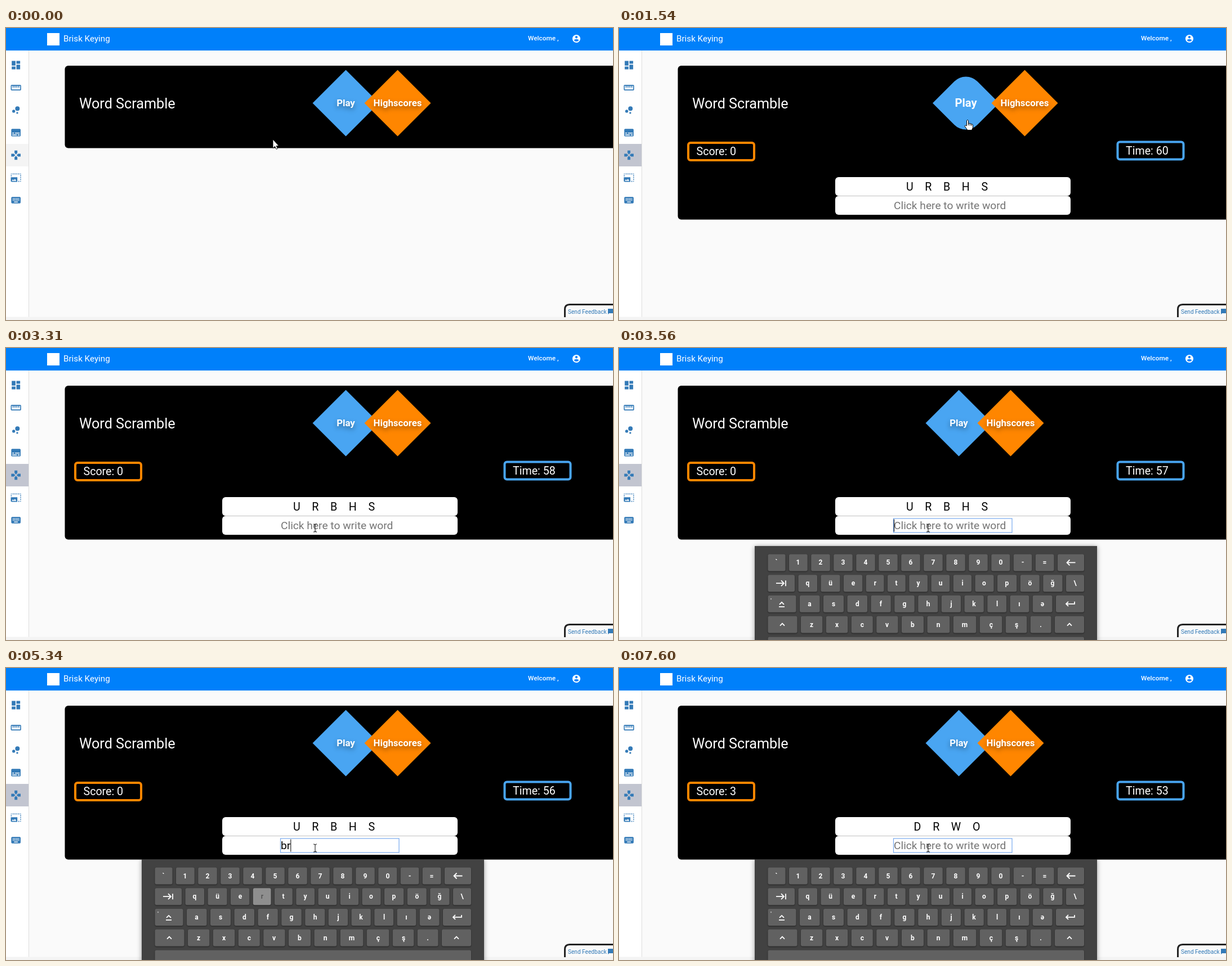
Write an HTML page that moves like this. It is 1078 by 519 pixels and loops after 8000 ms.

```html
<!DOCTYPE html>
<html lang="en">
<head>
<meta charset="utf-8">
<title>Word Scramble</title>
<style>
  html, body { margin: 0; width: 100%; height: 100%; overflow: hidden; background: #fafafa; }
  svg { display: block; font-family: Roboto, sans-serif; }
  .shade { filter: drop-shadow(0 4px 4px rgba(0,0,0,.4)); }
  .big { font-size: 19.6px; fill: #fff; }
  .button { font-weight: 700; font-size: 16.8px; fill: #fff; text-anchor: middle; }
  #keyboard { filter: drop-shadow(0 1px 4px rgba(0,0,0,.4)); }
  #keys { filter: drop-shadow(0 1px 1px rgba(0,0,0,.45)); font-weight: 700; font-size: 12px; text-anchor: middle; }
  #keys path { fill: none; stroke: #fff; stroke-width: 1.8; }
</style>
</head>
<body>
<svg width="1078" height="519" viewBox="0 0 1078 519">
  <rect width="1078" height="519" fill="#fafafa"/>
  <rect y="40" width="40" height="474" fill="#fff"/>
  <rect x="40" y="40" width="1" height="474" fill="#dedede"/>
  <rect y="513.5" width="1078" height="6" fill="#f4f4f4"/>
  <rect id="active" y="206" width="40" height="40"/>
  <g id="menu" fill="#337ab7"></g>

  <rect width="1078" height="40" fill="#0080fa"/>
  <rect x="73" y="9" width="22" height="22" fill="#fff"/>
  <text x="102" y="23.5" font-size="15.2" fill="#fff">Brisk Keying</text>
  <text x="927" y="22" font-size="11.8" font-weight="500" fill="#fff">Welcome ,</text>
  <path transform="translate(1004.6 10.6) scale(.7)" fill="#fff" d="M12 2C6.48 2 2 6.48 2 12s4.48 10 10 10 10-4.48 10-10S17.52 2 12 2zm0 3c1.66 0 3 1.34 3 3s-1.34 3-3 3-3-1.34-3-3 1.34-3 3-3zm0 14.2c-2.5 0-4.71-1.28-6-3.22.03-1.99 4-3.08 6-3.08 1.99 0 5.97 1.09 6 3.08-1.29 1.94-3.5 3.22-6 3.22z"/>

  <rect id="panel" x="104.5" y="67" width="1000" rx="6"/>
  <text x="130" y="142.5" font-size="25.2" fill="#fff">Word Scramble</text>
  <g id="play">
    <path id="playShape" fill="#49a5f2"/>
    <text id="playText" class="button">Play</text>
  </g>
  <g id="high">
    <path fill="#ff8600" d="M-59 0 0-59 59 0 0 59z"/>
    <text class="button shade" y="5.5">Highscores</text>
  </g>

  <g id="game">
    <rect x="123" y="204" width="117" height="31" rx="4" fill="none" stroke="#ff8600" stroke-width="4"/>
    <text id="score" class="big" x="137.5" y="226"></text>
    <rect x="885.5" y="202.5" width="117" height="31" rx="4" fill="none" stroke="#49a5f2" stroke-width="4"/>
    <text id="time" class="big" x="900" y="224.5"></text>
    <rect x="384" y="265" width="418" height="33.5" rx="6" fill="#fff"/>
    <rect x="384" y="298.5" width="418" height="33.5" rx="6" fill="#fff"/>
    <text id="letters" x="582.5" y="289" font-size="19.6" text-anchor="middle" word-spacing="15.8"></text>
    <rect id="focus" x="487.5" y="303" width="210.5" height="25" fill="none" stroke="#77a9ee" stroke-width="1.2"/>
    <text id="entry" x="488" y="322" font-size="19.2"></text>
    <rect id="caret" y="304.5" width="1" height="22"/>
  </g>

  <path d="M992.5 514V500q0-8.500 8.500-8.500H1080V514" fill="#fafafa" stroke="#222" stroke-width="3"/>
  <rect x="994" y="513.5" width="84" height="6" fill="#f4f4f4"/>
  <text x="998" y="507.500" font-size="10.100" fill="#337ab7">Send Feedback</text>
  <path d="M1069 499h10v8h-8l-2 2z" fill="#337ab7"/>

  <g id="keyboard">
    <rect x="241" y="340" width="608" height="206" fill="#424242"/>
    <g id="keys"></g>
    <circle cx="270" cy="434" r="1.200" fill="#aaa"/>
  </g>

  <g id="cursor" stroke-linejoin="round">
    <path id="arrow" d="M0 0V15.500L3.500 12.300 6 17.500 8.400 16.400 6 11.500H10.500z" fill="#fff" stroke="#000" stroke-width=".8"/>
    <path id="hand" d="M-1.500 9.500V1.500Q0-1 1.500 1.500V7Q3 5.800 4.200 7.200 6 6.300 7 8q2-.5 2.500 1.500V14L7.500 18.500H0L-5 11.500Q-4.500 8.800-1.500 11zM1.500 7V10M4.200 7.500V10.500M7 8.200V11" fill="#fff" stroke="#000" stroke-width="1"/>
    <path id="beam" d="M-3-7Q0-7 0-5 0-7 3-7M0-5.500V5.500M-3 7Q0 7 0 5 0 7 3 7" fill="none" stroke="#222" stroke-width="1.100"/>
  </g>
</svg>
<script>
const $ = id => document.getElementById(id);
const clamp = v => Math.max(0, Math.min(1, v));
const ramp = (t, a, b) => clamp((t - a) / (b - a));
const show = (id, on) => $(id).style.display = on ? '' : 'none';
const move = (id, x, y) => $(id).setAttribute('transform', `translate(${x} ${y})`);

// Side menu, drawn on a 24-unit grid
const menuIcons = [
  'M3 13h8V3H3zM3 21h8v-6H3zM13 21h8V11h-8zM13 3v6h8V3z',
  'M21 6H3c-1.1 0-2 .9-2 2v8c0 1.1.9 2 2 2h18c1.1 0 2-.9 2-2V8c0-1.100-.9-2-2-2zm0 10H3V8h2v4h2V8h2v4h2V8h2v4h2V8h2v4h2V8h2z',
  'M4 14.400a3.200 3.200 0 1 0 6.400 0 3.200 3.200 0 1 0-6.400 0M12.800 18a2 2 0 1 0 4 0 2 2 0 1 0-4 0M10.400 8.800a4.800 4.800 0 1 0 9.600 0 4.800 4.800 0 1 0-9.600 0',
  'M20 4H4c-1.100 0-2 .9-2 2v12c0 1.100.9 2 2 2h16c1.100 0 2-.9 2-2V6c0-1.100-.9-2-2-2zM4 12h4v2H4zm10 6H4v-2h10zm6 0h-4v-2h4zm0-4H10v-2h10z',
  'M15 7.500V2H9v5.500l3 3zM7.500 9H2v6h5.500l3-3zM9 16.500V22h6v-5.500l-3-3zM16.500 9l-3 3 3 3H22V9z',
  'M21 15h2v2h-2zm0-4h2v2h-2zm2 8h-2v2c1 0 2-1 2-2zM13 3h2v2h-2zm8 4h2v2h-2zm0-4v2h2c0-1-1-2-2-2zM1 7h2v2H1zm16-4h2v2h-2zm0 16h2v2h-2zM3 3C2 3 1 4 1 5h2zm6 0h2v2H9zM5 3h2v2H5zm-4 8v8c0 1.100.9 2 2 2h12V11zm2 8l2.500-3.200 1.800 2.100 2.500-3.200L13 19z',
  'M4 5Q2 5 2 7V17q0 2 2 2H20q2 0 2-2V7q0-2-2-2z' +
    [5, 8, 11, 14, 17].map(x => `M${x} 8v2h2v-2zM${x} 11v2h2v-2z`).join('') + 'M8 15v2h8v-2z'
];
$('menu').innerHTML = menuIcons.map((d, i) =>
  `<path transform="translate(7.700 ${56 + 40 * i}) scale(.83)" fill-rule="evenodd" d="${d}"/>`).join('');

// Keyboard rows: first width, last width, labels, label centres
const keyIcons = {
  '←': 'M8 0H-7m5-5-5 5 5 5', '⇥': 'M-9 0H5m-5-5 5 5-5 5M8-5V5', '⇪': 'M-4 1 0-3 4 1M-5 5H5',
  '↵': 'M8-4V0H-7m4-4-4 4 4 4', '^': 'M-4 2 0-2 4 2'
};
const rows = [
  [31, 47, '`1234567890-=←', [279.5, 318, 358, 398, 438, 478, 518, 558, 598, 638, 678, 717, 756, 802.5]],
  [47.5, 32, '⇥qüertyuiopöğ\\', [288, 335, 375.5, 416, 455, 492.5, 531.5, 571, 610, 648.5, 689, 730, 770, 810]],
  [50, 50, '⇪asdfghjklıə↵', [289, 338.5, 381, 423.5, 465, 507, 549, 590, 630.5, 671.5, 711, 752, 801]],
  [52, 52, '^zxcvbnmçş.^', [290, 342, 387, 432, 476, 521.5, 567, 614, 661, 706, 749, 800]]
];
const LEFT = 264.5, RIGHT = 826, GAP = 6.5;
const keyBox = (x, y, w) => `<rect x="${x}" y="${y}" width="${w}" height="30" rx="3" fill="#616161"/>`;
let keyMarkup = keyBox(LEFT, 501.5, RIGHT - LEFT);
rows.forEach(([first, last, labels, mid], r) => {
  const y = 354.5 + 36.7 * r, end = mid.length - 1;
  // centre of the gap that follows key i
  const seam = i => i < 0 ? LEFT - GAP / 2 : i === end ? RIGHT + GAP / 2 :
    i === 0 ? LEFT + first + GAP / 2 : i === end - 1 ? RIGHT - last - GAP / 2 : (mid[i] + mid[i + 1]) / 2;
  mid.forEach((x, i) => {
    const c = labels[i], a = seam(i - 1) + GAP / 2;
    keyMarkup += `<g id="key-${r}-${c}">` + keyBox(a, y, seam(i) - GAP / 2 - a) + (keyIcons[c]
      ? `<path transform="translate(${x} ${y + 15})" d="${keyIcons[c]}"/>`
      : `<text x="${x}" y="${y + 19}" fill="#fff">${c}</text>`) + '</g>';
  });
});
$('keys').innerHTML = keyMarkup;

const START = 1540, FOCUS = 3480, SOLVED = 7050;
const ticks = [1620, 2460, 3480, 4490, 5500, 6500, 7515];
const strokes = [[4810, 'b', 3], [5340, 'r', 1], [5680, 'u', 1], [6500, 's', 2], [6970, 'h', 2]];
const path = [[383, 474, 198], [850, 619, 163], [2003, 619, 163], [2380, 572, 276],
  [2540, 556, 313], [2780, 556, 313], [3020, 551, 319], [3160, 547, 319], [3310, 549, 320]];

function pointer(t) {
  const i = path.findIndex(p => p[0] > t);
  if (i === 0) return path[0].slice(1);
  if (i < 0) return path[path.length - 1].slice(1);
  const [t0, x0, y0] = path[i - 1], [t1, x1, y1] = path[i], k = (t - t0) / (t1 - t0);
  return [x0 + (x1 - x0) * k, y0 + (y1 - y0) * k];
}

function draw(t) {
  const s = Math.floor((t + 10) / 77) * 77;

  const [x, y] = pointer(s), hand = t >= 690 && t < 2150, beam = t >= 2300;
  move('cursor', x, y);
  show('arrow', !hand && !beam);
  show('hand', hand);
  show('beam', beam);

  const hover = ramp(s, 650, 800) - ramp(s, 2060, 2230);
  const press = ramp(s, 1340, 1460) - ramp(s, 1545, 1690);
  const r = 29 * press, k = r / Math.SQRT2;
  move('play', 603.5 + 12.5 * hover, 133.5);
  move('high', 695.5 + 25 * hover, 133.5);
  $('playShape').setAttribute('d', `M-59 0 ${-k} ${k - 59}A${r} ${r} 0 0 1 ${k} ${k - 59}L59 0 ${k} ${59 - k}A${r} ${r} 0 0 1 ${-k} ${59 - k}Z`);
  $('playText').style.fontSize = 16.8 + 3.4 * press + 'px';
  $('playText').setAttribute('y', 5.5 + press);
  $('playText').classList.toggle('shade', press < .5);

  const open = t >= START;
  $('panel').setAttribute('height', open ? 273.5 : 146.5);
  $('active').setAttribute('fill', open ? '#c2c5d0' : '#f4f4f4');
  show('game', open);
  $('score').textContent = 'Score: ' + (t >= SOLVED ? 3 : 0);
  $('time').textContent = 'Time: ' + (60 - ticks.filter(v => t >= v).length);
  $('letters').textContent = t >= SOLVED ? 'D R W O' : 'U R B H S';

  const done = strokes.filter(v => t >= v[0]);
  const word = t >= SOLVED ? '' : done.map(v => v[1]).join('');
  $('entry').textContent = word || 'Click here to write word';
  $('entry').setAttribute('fill', word ? '#000' : '#757575');
  const since = t - (done.length ? done[done.length - 1][0] : 3420);
  show('focus', t >= FOCUS);
  show('caret', t >= FOCUS && Math.floor(since / 530) % 2 === 0);
  $('caret').setAttribute('x', 488 + (word ? $('entry').getComputedTextLength() : 0));

  show('keyboard', t >= FOCUS);
  move('keyboard', 0, 206 * (1 - ramp(s + 18, 3426, 3621)) ** 2.45);
  strokes.forEach(([at, c, row]) => {
    const glow = t < at ? 0 : 1 - ramp(t, at + 80, at + 290);
    const [box, label] = $(`key-${row}-${c}`).children;
    const grey = v => `rgb(${v},${v},${v})`;
    box.setAttribute('fill', grey(97 + 46 * glow));
    label.setAttribute('fill', grey(255 - 170 * glow));
  });
}

const begin = performance.now();
(function loop() {
  draw((performance.now() - begin) % 8000);
  requestAnimationFrame(loop);
})();
</script>
</body>
</html>
```
